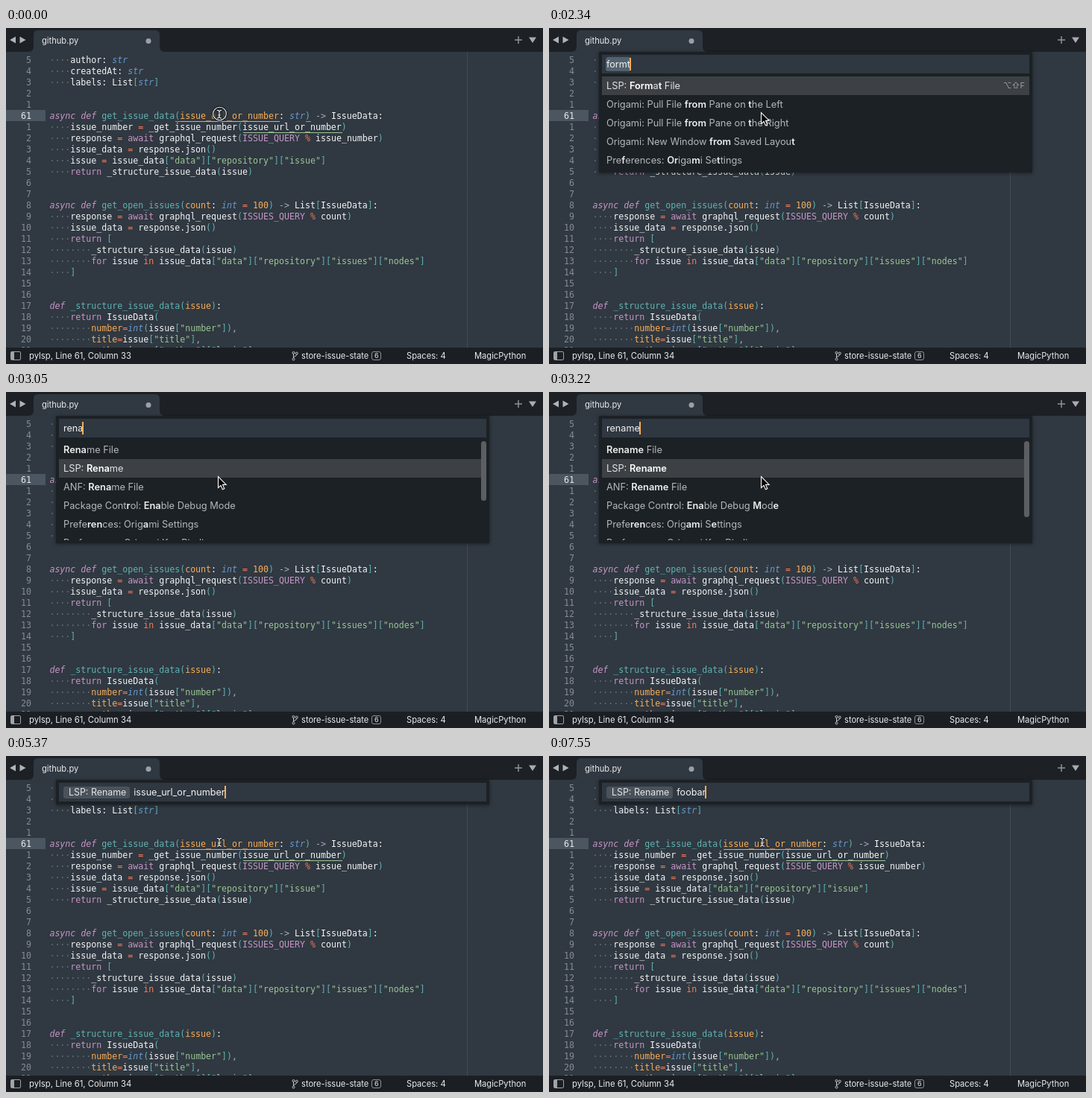
These frames come from a looping animation (720x451 px, 7.99 s). An HTML page:

```html
<!DOCTYPE html>
<html lang="en">
<head>
<meta charset="utf-8">
<title>Rename symbol</title>
<style>
html, body { margin: 0; width: 100%; height: 100%; overflow: hidden; background: #303841; }
#stage { position: relative; width: 720px; height: 451px; overflow: hidden; background: #303841;
  font: 11.15px/16px Inter, "Open Sans", sans-serif; color: #e9ebed; }
#stage div, #stage svg { position: absolute; }
svg { left: 0; top: 0; }
.ui { white-space: pre; }
.row { left: 58.4px; height: 15px; white-space: pre; color: #f3f5f7;
  font: 11.628px/15px "DejaVu Sans Mono", "Liberation Mono", monospace; }
.row.num { left: 0; width: 34px; text-align: right; color: #848b95; }
.row.num.now { color: #e6e9ed; }
.row i { font-style: italic; }
.dots { color: #66707a; } .str { color: #99c794; } .def, .key, .con { color: #c695c6; }
.fn, .br { color: #5fb4b4; } .par, .dig { color: #f9ae58; } .type { color: #6699cc; }
.op { color: #f97b58; } .arr { color: #a6acb9; }
.line { height: 1px; }
#panel { left: 67px; top: 32px; width: 581px; background: #1c2125; box-shadow: 0 1px 5px rgba(0,0,0,.45); }
#input { left: 4px; top: 4px; width: 567px; height: 25px; padding-left: 6px; background: #2f3740;
  font-size: 12.6px; line-height: 25px; white-space: pre; color: #f2f3f4; display: flex; align-items: center; }
#chip { height: 16px; line-height: 16px; padding: 0 5px 0 7px; margin-right: 5px; border-radius: 3px;
  font-size: 12.4px; background: #4a525b; color: #e3e5e7; }
#word { position: relative; height: 17px; line-height: 17px; }
#word.sel { background: #53626f; border-radius: 2px; box-shadow: 0 0 0 .5px #7a8794; }
#stage #caret { width: 2px; height: 17px; top: 0; background: #f9ae58; }
#list { left: 4px; top: 33px; width: 573px; overflow: hidden; font-size: 12.8px; color: #b4b8bb; }
#stage #list .item { position: relative; height: 25px; line-height: 25px; padding-left: 6px; white-space: pre; }
.item b { font-weight: 600; color: #eceeef; }
.item.on { background: #3d4145; color: #dfe1e3; }
.item.on b { color: #fff; }
.item kbd { position: absolute; right: 6px; font: 11px/25px Inter, "DejaVu Sans", sans-serif; color: #9a9ea2; }
#thumb { left: 570px; top: 34px; width: 7px; border-radius: 3.5px; background: #5b5f63; }
</style>
</head>
<body>
<div id="stage">
  <div style="left:0;top:110px;width:53px;height:15px;background:#4b5661"></div>
  <div style="left:618px;top:32px;height:397px;border-left:1px dotted #56606a"></div>
  <div id="code"></div>
  <div class="line" style="left:234px;top:125px;width:133px;background:#d9b163"></div>
  <div class="line" style="left:318px;top:140px;width:133px;background:#99c794"></div>
  <div id="pair">
    <div class="line" style="left:227px;top:125px;width:7px;background:#5fb4b4"></div>
    <div class="line" style="left:402px;top:125px;width:7px;background:#5fb4b4"></div>
  </div>

  <div style="left:0;top:0;width:720px;height:32px;background:#1d2126"></div>
  <div style="left:0;top:429px;width:720px;height:22px;background:#1b1f24"></div>
  <svg width="720" height="451" fill="none">
    <path d="M30 32Q37 32 37 25V9Q37 3 43 3H200Q206 3 206 9V25Q206 32 213 32Z" fill="#303841"/>
    <path d="M13 11.5V20.5L5 16ZM18.500 11.500V20.500L26.500 16Z" fill="#b0b4b8"/>
    <circle cx="191" cy="17.500" r="3.500" fill="#9ba1a7"/>
    <path d="M682 16H692M687 11V21" stroke="#8f9397" stroke-width="1.500"/>
    <path d="M701 12.500H711L706 20Z" fill="#a9adb1"/>
    <rect x="6.500" y="434.500" width="13" height="11" rx="1.500" stroke="#a0a4a8"/>
    <path d="M7 435H11V445H7Z" fill="#a0a4a8"/>
    <g stroke="#c3c6c9">
      <path d="M385.500 437V443M389.800 438.200Q389.800 440.500 385.500 441.500"/>
      <circle cx="385.500" cy="436" r="1.500"/><circle cx="385.500" cy="444.500" r="1.500"/>
      <circle cx="389.800" cy="436.700" r="1.500"/>
      <rect x="490.500" y="434.500" width="12" height="11" rx="2.500" stroke="#8d9195"/>
    </g>
  </svg>
  <div class="ui" style="left:48px;top:9px">github.py</div>
  <div class="ui" id="status" style="left:31px;top:432px;font-size:11.3px"></div>
  <div class="ui" style="left:396px;top:432px">store-issue-state</div>
  <div class="ui" style="left:494px;top:432px;font-size:9px">6</div>
  <div class="ui" style="left:537px;top:432px">Spaces: 4</div>
  <div class="ui" style="left:628px;top:432px">MagicPython</div>

  <div id="panel">
    <div id="input"><span id="chip">LSP: Rename</span><span id="word"><span id="text"></span><div id="caret"></div></span></div>
    <div id="list"></div>
    <div id="thumb"></div>
  </div>

  <svg width="720" height="451" fill="none">
    <defs>
      <path id="bar" d="M283 110.500H284.500L286 112L287.500 110.500H289M286 112V119.500M283 121H284.500L286 119.500L287.500 121H289M284.500 117H287.500"/>
    </defs>
    <g id="ring">
      <circle cx="286.500" cy="115" r="9" fill="#2a3138" fill-opacity=".75" stroke="#111519" stroke-width="2.800"/>
      <circle cx="286.500" cy="115" r="8.800" stroke="#f4f5f6" stroke-width="1.100"/>
    </g>
    <g id="beam">
      <use href="#bar" stroke="#111" stroke-width="2.400"/>
      <use href="#bar" stroke="#fff" stroke-width="1.100"/>
    </g>
    <path id="arrow" d="M284.500 113.500V128.500L288 125.300L290.400 130.800L292.800 129.800L290.500 124.400H295.200Z" fill="#000" stroke="#fff" stroke-width="1.100"/>
  </svg>
</div>

<script>
const $ = id => document.getElementById(id);

const source = `    author: str
    createdAt: str
    labels: List[str]


async def get_issue_data(issue_url_or_number: str) -> IssueData:
    issue_number = _get_issue_number(issue_url_or_number)
    response = await graphql_request(ISSUE_QUERY % issue_number)
    issue_data = response.json()
    issue = issue_data["data"]["repository"]["issue"]
    return _structure_issue_data(issue)


async def get_open_issues(count: int = 100) -> List[IssueData]:
    response = await graphql_request(ISSUES_QUERY % count)
    issue_data = response.json()
    return [
        _structure_issue_data(issue)
        for issue in issue_data["data"]["repository"]["issues"]["nodes"]
    ]


def _structure_issue_data(issue):
    return IssueData(
        number=int(issue["number"]),
        title=issue["title"],
        author=issue["author"]["login"],`.split("\n");

const token = new RegExp([
  "(?<dots>^ +)", '(?<str>"[^"]*")', "(?<def>\\b(?:async def|def)\\b)",
  "(?<fn>(?<=def )\\w+)", "(?<par>(?<=def \\w+\\()\\w+|\\b\\w+(?==\\S))",
  "(?<key>\\b(?:await|return|for)\\b)", "(?<type>\\b(?:str|int)\\b)",
  "(?<con>\\b[A-Z_]{3,}\\b)", "(?<dig>\\b\\d+\\b)", "(?<arr>->|,)",
  "(?<op>[=%]|\\bin\\b)", "(?<br>[()\\[\\]])", "\\w+"
].join("|"), "g");

function paint(line) {
  return line.replace(token, (...args) => {
    const kind = Object.entries(args.at(-1)).find(e => e[1])?.[0];
    if (!kind) return args[0];
    const tag = kind === "def" || kind === "type" ? "i" : "span";
    const text = kind === "dots" ? "·".repeat(args[0].length) : args[0];
    return `<${tag} class="${kind}">${text.replace(">", "&gt;")}</${tag}>`;
  });
}

const current = 5;
$("code").innerHTML = source.map((line, i) => {
  const top = `style="top:${36 + 15 * i}px"`;
  const now = i === current;
  return `<div class="row num${now ? " now" : ""}" ${top}>${now ? 61 : Math.abs(i - current)}</div>` +
    `<div class="row" ${top}>${paint(line)}</div>`;
}).join("");

// Asterisks enclose the letters matched by the query.
const formatItems = [
  "LSP: *Form*a*t* File", "Origami: Pull File *from* Pane on *t*he Left",
  "Origami: Pull File *from* Pane on *t*he Right",
  "Origami: New Window *from* Saved Layou*t*", "Pre*f*erences: *Or*iga*m*i Se*t*tings"];
const reItems = [
  "Set Syntax: *R*egular *E*xpression", "*Re*name File", "Set Syntax: Magic*R*eg*E*xp",
  "File: *Re*vert", "LSP: *Re*name", "ANF: *Re*name File"];
const renameItems = [
  "*Rename* File", "LSP: *Rename*", "ANF: *Rename* File",
  "Package Cont*r*ol: *Ena*ble Debug *M*od*e*", "Prefe*ren*ces: Orig*am*i S*e*ttings",
  "Prefe*ren*ces: Orig*am*i K*e*y Bindings"];

function mark(item, left) {
  return item.split("*").map((part, i) => {
    if (i % 2 === 0) return part;
    const hit = part.slice(0, left);
    left -= hit.length;
    return `<b>${hit}</b>${part.slice(hit.length)}`;
  }).join("");
}

const name = "issue_url_or_number";
const find = (text, items, thumb) => ({ text, items, thumb, on: 1, sel: false });
const type = text => ({ text, sel: false, start: false });

// Each step changes only the listed parts of the state.
const steps = [
  [0, { ring: true, col: 33, pointer: "beam" }],
  [90, { ring: false }],
  [1260, { ring: true, col: 34 }],
  [1350, { ring: false }],
  [2250, { text: "formt", sel: true, items: formatItems, on: 0 }],
  [2340, { pointer: "arrow" }],
  [2700, find("r", reItems, 24)],
  [2780, find("re", reItems, 24)],
  [2870, find("ren", renameItems, 60)],
  [3050, find("rena", renameItems, 80)],
  [3140, find("renam", renameItems, 102)],
  [3220, find("rename", renameItems, 102)],
  [3750, { thumb: 0 }],
  [4290, { text: name, sel: true, items: null, chip: true }],
  [4380, { pointer: "beam" }],
  [5370, { sel: false }],
  [5730, { start: true }],
  [6180, { start: false }],
  [6540, { sel: true, start: true }],
  [6930, type("f")],
  [7110, type("fo")],
  [7290, type("foo")],
  [7380, type("foob")],
  [7460, type("fooba")],
  [7550, type("foobar")]
];
const duration = 7990;

const show = (id, on) => { $(id).style.display = on ? "" : "none"; };

function render(count) {
  const s = Object.assign({}, ...steps.slice(0, count).map(step => step[1]));
  const open = s.text !== undefined;
  $("status").textContent = `pylsp, Line 61, Column ${s.col}`;
  show("ring", s.ring);
  show("beam", s.pointer === "beam");
  show("arrow", s.pointer === "arrow");
  show("pair", !open);
  show("panel", open);
  if (!open) return;
  show("chip", s.chip);
  show("list", s.items);
  show("thumb", s.thumb);
  $("text").textContent = s.text;
  $("word").className = s.sel ? "sel" : "";
  $("caret").style.left = s.start ? "-1px" : "calc(100% - 1px)";
  $("thumb").style.height = `${s.thumb || 0}px`;
  const height = !s.items ? 0 : s.items.length > 5 ? 134 : 125;
  $("panel").style.height = `${33 + height + (s.items ? 4 : 0)}px`;
  $("list").style.height = `${height}px`;
  const limit = s.items === formatItems ? 5 : s.text.length;
  $("list").innerHTML = (s.items || []).map((item, i) =>
    `<div class="item${i === s.on ? " on" : ""}">${mark(item, limit)}` +
    `${s.items === formatItems && i === 0 ? "<kbd>⌥⇧F</kbd>" : ""}</div>`).join("");
}

let shown = 0;
function tick() {
  const t = performance.now() % duration;
  const count = steps.filter(step => step[0] <= t).length;
  if (count !== shown) render(shown = count);
  requestAnimationFrame(tick);
}
tick();
</script>
</body>
</html>
```
